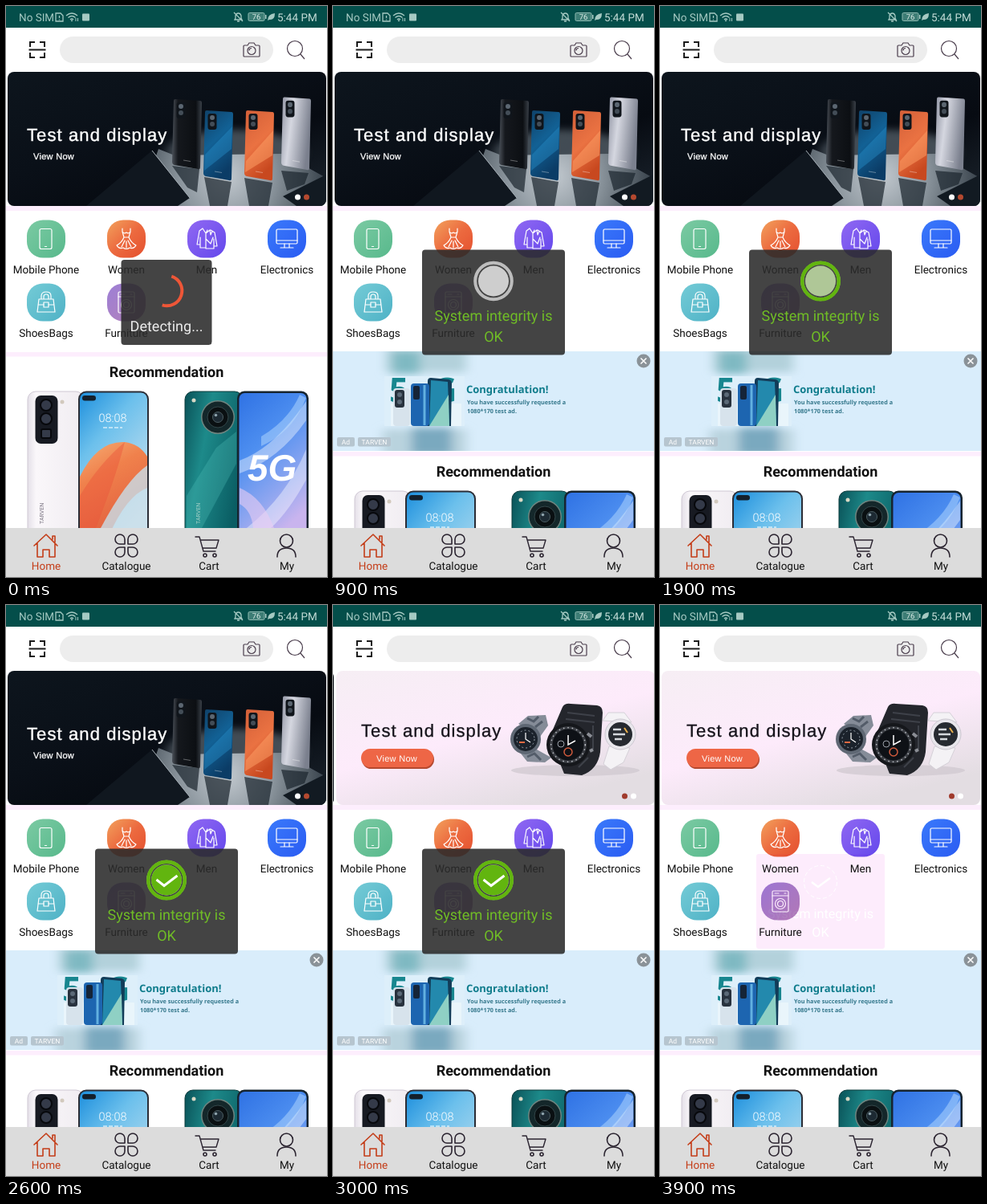
An HTML page for the animation above (4 s loop, 400 by 711 pixels).

```html
<!DOCTYPE html>
<html lang="en">
<head>
<meta charset="utf-8">
<title>Shop home</title>
<style>
  html, body { margin: 0; width: 100%; height: 100%; overflow: hidden; background: #fff; }
  svg { display: block; width: 400px; height: 711px; }
  text { font-family: Roboto, sans-serif; text-rendering: geometricPrecision; }
  .arial { font-family: "Liberation Sans", Arial, sans-serif; }
  .noto { font-family: "Noto Sans", sans-serif; }
  .mid { text-anchor: middle; }
  .label { font-size: 13.5px; text-anchor: middle; }
  .line { fill: none; stroke: #fff; stroke-width: 1.2; stroke-linejoin: round; stroke-linecap: round; }
  .nav { fill: none; stroke: #2b2430; stroke-width: 1.6; stroke-linejoin: round; stroke-linecap: round; }
  #ghost { mix-blend-mode: multiply; }
</style>
</head>
<body>
<svg viewBox="0 0 400 711">
  <defs>
    <linearGradient id="night" x2="1" y2="1">
      <stop offset="0" stop-color="#0d151d"/><stop offset=".4" stop-color="#0a1018"/><stop offset=".65" stop-color="#070b12"/><stop offset="1" stop-color="#1c252e"/>
    </linearGradient>
    <radialGradient id="floor" gradientUnits="userSpaceOnUse" cx="275" cy="212" r="125">
      <stop offset="0" stop-color="#c2c9cf"/><stop offset=".45" stop-color="#8d979f"/><stop offset="1" stop-color="#353f48"/>
    </radialGradient>
    <linearGradient id="day" x2=".6" y2="1">
      <stop offset="0" stop-color="#f6eef4"/><stop offset=".55" stop-color="#fdebfb"/><stop offset="1" stop-color="#e3dde2"/>
    </linearGradient>
    <linearGradient id="black" x2="1"><stop offset="0" stop-color="#4a5058"/><stop offset=".2" stop-color="#15181d"/><stop offset=".8" stop-color="#0c0f13"/><stop offset="1" stop-color="#3a4048"/></linearGradient>
    <linearGradient id="blue" x2=".4" y2="1"><stop offset="0" stop-color="#0f4168"/><stop offset=".5" stop-color="#126195"/><stop offset="1" stop-color="#0b3c66"/></linearGradient>
    <linearGradient id="orange" x2=".4" y2="1"><stop offset="0" stop-color="#d25f38"/><stop offset=".55" stop-color="#ea7242"/><stop offset="1" stop-color="#c8481f"/></linearGradient>
    <linearGradient id="silver" x2="1" y2=".3"><stop offset="0" stop-color="#8d91a0"/><stop offset=".4" stop-color="#d5d7e0"/><stop offset="1" stop-color="#7b808e"/></linearGradient>
    <linearGradient id="pearl" x2="1"><stop offset="0" stop-color="#e4e0e8"/><stop offset=".15" stop-color="#faf7fa"/><stop offset="1" stop-color="#f0ecf1"/></linearGradient>
    <linearGradient id="sky" y2="1" x2=".5"><stop offset="0" stop-color="#1d8fdd"/><stop offset=".35" stop-color="#6cc0ec"/><stop offset="1" stop-color="#d6e6ef"/></linearGradient>
    <linearGradient id="dune" y2="1" x2=".4"><stop offset="0" stop-color="#f5ad74"/><stop offset=".4" stop-color="#f0814c"/><stop offset="1" stop-color="#e2603f"/></linearGradient>
    <linearGradient id="teal" x2="1" y2=".5"><stop offset="0" stop-color="#0a5258"/><stop offset=".4" stop-color="#1d8a8a"/><stop offset="1" stop-color="#0a5d63"/></linearGradient>
    <linearGradient id="dawn" y2="1" x2=".4"><stop offset="0" stop-color="#2f72e4"/><stop offset=".4" stop-color="#4e8ff0"/><stop offset=".75" stop-color="#8fa6f0"/><stop offset="1" stop-color="#c9b4ee"/></linearGradient>
    <linearGradient id="green1" y2="1" x2="1"><stop offset="0" stop-color="#7bcaa3"/><stop offset="1" stop-color="#58b98c"/></linearGradient>
    <linearGradient id="red1" y2="1" x2="1"><stop offset="0" stop-color="#f2a25d"/><stop offset=".5" stop-color="#ec6a3f"/><stop offset="1" stop-color="#e4502f"/></linearGradient>
    <linearGradient id="violet1" y2="1" x2="1"><stop offset="0" stop-color="#9068f2"/><stop offset="1" stop-color="#6448ec"/></linearGradient>
    <linearGradient id="blue1" y2="1" x2="1"><stop offset="0" stop-color="#3a79fb"/><stop offset="1" stop-color="#2a5cf2"/></linearGradient>
    <linearGradient id="cyan1" y2="1" x2="1"><stop offset="0" stop-color="#74cbd6"/><stop offset="1" stop-color="#4fb2c6"/></linearGradient>
    <linearGradient id="plum1" y2="1" x2="1"><stop offset="0" stop-color="#9d7fd6"/><stop offset="1" stop-color="#b482b8"/></linearGradient>
    <filter id="blur" x="-.3" y="-.5" width="1.6" height="2"><feGaussianBlur stdDeviation="7 5"/></filter>
    <clipPath id="bannerBox"><rect y="82" width="400" height="168"/></clipPath>
    <clipPath id="card"><rect x="2" y="82" width="397" height="167" rx="8"/></clipPath>
    <clipPath id="adBox"><rect y="430" width="400" height="124"/></clipPath>
    <g id="phone">
      <path d="M4 2 35 4Q37 4 37 7L35 87Q35 90 32 89L3 84Q0 83 0 80L2 4Q2 2 4 2Z"/>
      <rect x="5.500" y="6" width="11" height="20" rx="3" fill="#10151b"/>
      <circle cx="11" cy="11" r="3" fill="#5b6671"/><circle cx="11" cy="19" r="3" fill="#434d57"/>
      <path d="M14 78l9 1.500" stroke="#fff" opacity=".35"/>
    </g>
    <g id="tile"><rect x="-24" y="-23.500" width="48" height="47" rx="20"/></g>
  </defs>

  <rect width="400" height="711" fill="#fff"/>

  <!-- status bar -->
  <rect width="400" height="27" fill="#044e4a"/>
  <g fill="#a5c9c2" font-size="13.500">
    <text x="16" y="19">No SIM</text>
    <text x="338" y="19" fill="#c4dcd7">5:44 PM</text>
    <rect x="95" y="9.500" width="9" height="9" rx="1"/>
    <path d="M326 18q0-8 9-9q0 9-7 8z"/>
    <rect x="323" y="11" width="1.500" height="5"/>
    <rect x="302" y="8.500" width="20" height="10" rx="1.500" fill="#3d7d75" stroke="#8db8b0"/>
    <text x="312" y="17" font-size="9.500" class="mid" fill="#dcebe7">76</text>
    <g fill="none" stroke="#a5c9c2" stroke-width="1.300">
      <path d="M62 9h6l3 3v7h-9zM66.500 12v3M66.500 16.500v1"/>
      <path d="M75 12q7-6 14 0M77.500 14.500q4.500-4 9 0M80 17q2-2 4 0"/>
      <path d="M285 17h9l-1-2v-3q-1-3-3.500-3t-3.500 3v3zM288 19h3M284 8l11 11"/>
    </g>
    <circle cx="82" cy="18.300" r="1"/><path d="M87 15v4M89.500 15v4" stroke="#a5c9c2"/>
  </g>

  <!-- search row -->
  <rect x="67" y="38" width="266" height="33" rx="16.500" fill="#ededed"/>
  <path d="M30 51v-6h6M42 45h6v6M48 58v6h-6M36 64h-6v-6M28.500 54.500h21" fill="none" stroke="#1b1b1b" stroke-width="2"/>
  <g fill="none" stroke="#4a3d4c" stroke-width="1.200">
    <path d="M297 49h4l2-3h6l2 3h4q1 0 1 1v12q0 1-1 1h-18q-1 0-1-1v-12q0-1 1-1z"/>
    <circle cx="306" cy="55.500" r="5"/><path d="M303 55.500q0-3 3-3"/>
    <circle cx="360" cy="53" r="9.500"/><path d="M367 60l5 6"/>
  </g>

  <!-- carousel -->
  <rect y="249" width="400" height="6" fill="#fdeefd"/>
  <g clip-path="url(#bannerBox)">
    <g id="slides">
      <g clip-path="url(#card)">
        <rect x="2" y="82" width="397" height="167" fill="url(#night)"/>
        <ellipse cx="285" cy="182" rx="85" ry="28" fill="#6b7780" opacity=".6" filter="url(#blur)"/>
        <path d="M165 249 190 178 210 186 345 184 399 214V249Z" fill="url(#floor)"/>
        <path d="M100 249 182 180 229 239 214 249Z" fill="#10171f"/>
        <path d="M182 180 229 239" stroke="#a8b1b8" stroke-width="1"/>
        <path d="M345 237 399 210V249H362Z" fill="#121a22"/>
        <path d="M207 199 241 203 238 232 226 226ZM247 213 281 219 276 249H254ZM297 214 332 220 327 249H303ZM343 205 377 208 372 222 350 230Z" fill="#1b242d" opacity=".7"/>
        <use href="#phone" x="207" y="114" fill="url(#black)"/>
        <use href="#phone" x="343" y="111" transform="translate(0 -4) scale(1 1.040)" fill="url(#silver)"/>
        <use href="#phone" x="246" y="128" fill="url(#blue)"/>
        <path d="M248 185 282 150 281 178 247 205Z" fill="#2a92cc" opacity=".4"/>
        <use href="#phone" x="297" y="128" fill="url(#orange)"/>
        <path d="M299 193 333 155 332 186 298 207Z" fill="#ffa169" opacity=".5"/>
        <text class="arial" x="26" y="168" font-size="22" letter-spacing="1.100" fill="#fff" stroke="#fff" stroke-width=".4">Test and display</text>
        <text class="arial" x="34" y="191" font-size="11" letter-spacing=".3" fill="#fff" stroke="#fff" stroke-width=".3">View Now</text>
      </g>
      <g transform="translate(400)"><g clip-path="url(#card)">
        <rect x="2" y="82" width="397" height="167" fill="url(#day)"/>
        <ellipse cx="300" cy="206" rx="80" ry="7" fill="#cfc8cf" opacity=".7"/>
        <text class="arial" x="33" y="164" font-size="22" letter-spacing="1.100" fill="#15121a" stroke="#15121a" stroke-width=".3">Test and display</text>
        <rect x="34" y="181" width="90" height="23" rx="11.500" fill="#b5492f"/>
        <rect x="33" y="179" width="90" height="23" rx="11.500" fill="#ee6646"/>
        <text class="arial" x="52" y="195" font-size="11" letter-spacing=".3" fill="#fff">View Now</text>
        <!-- camouflage watch -->
        <path d="M229 148 241 138 263 137 266 150 256 164ZM228 180 252 180 270 190 262 196 240 195Z" fill="#858c98"/>
        <path d="M240 141l8 4 6-6M250 152l9-7M240 189l9-4 8 8" stroke="#535c69" stroke-width="3" fill="none"/>
        <circle cx="238" cy="167" r="19" fill="#5f6874"/><circle cx="238" cy="167" r="15" fill="#1b222b"/>
        <circle cx="238" cy="167" r="11" fill="none" stroke="#9aa4ae" stroke-dasharray="2 3"/>
        <path d="M238 159v8l6 4" stroke="#fff" stroke-width="1.200" fill="none"/>
        <path d="M230 171h7" stroke="#e06a42" stroke-width="2"/>
        <!-- white watch -->
        <path d="M334 144 341 134 361 134 370 146ZM342 176 368 178 360 196 344 205 335 198Z" fill="#f4f2f5" stroke="#d5d1d8"/>
        <circle cx="356" cy="161" r="19" fill="#e9e7ec" stroke="#cac6cf"/><circle cx="356" cy="161" r="15" fill="#262a30"/>
        <path d="M347 155h10M347 161h15M349 167h9" stroke="#d4d8dc" stroke-width="2.500"/><path d="M361 153l4 6" stroke="#e9b04b" stroke-width="2"/>
        <!-- black watch -->
        <path d="M272 155 284 127Q287 122 294 123L327 125Q334 126 334 134L331 183Q328 205 308 212L286 210 282 200Z" fill="#24262c"/>
        <path d="M290 134l34 4M288 142l36 4M322 150v30M316 190l-12 12" stroke="#3e4149" stroke-width="2"/>
        <circle cx="291" cy="174" r="27" fill="#15171b"/><circle cx="291" cy="174" r="23" fill="#3a3d43"/><circle cx="291" cy="174" r="19.500" fill="#0e1116"/>
        <circle cx="291" cy="174" r="21.300" fill="none" stroke="#b9bcc2" stroke-width="1.500" stroke-dasharray="1.500 4"/>
        <circle cx="291" cy="183" r="5" fill="none" stroke="#cf5a3c" stroke-width="1.500"/><circle cx="282" cy="173" r="4" fill="none" stroke="#9aa0a8"/>
        <path d="M291 162v12l9-5" stroke="#fff" stroke-width="1.500" fill="none"/>
        <path d="M315 160l5 4M318 182l4-2" stroke="#8b8e95" stroke-width="4"/>
      </g></g>
    </g>
  </g>
  <circle id="dotA" cx="363.500" cy="238" r="3.500"/><circle id="dotB" cx="374.500" cy="238" r="3.500"/>

  <!-- categories -->
  <g transform="translate(50 290)"><use href="#tile" fill="url(#green1)"/>
    <g class="line"><rect x="-8" y="-12.500" width="15" height="25" rx="2"/><path d="M-1.500 9.500h2"/></g></g>
  <g transform="translate(150 290)"><use href="#tile" fill="url(#red1)"/>
    <path class="line" d="M-5-13v4q2 3 5 1q3 2 5-1v-4M-5-9l2 7h6l2-7M-3-2Q-6 5-12 8Q-9 13-4 11Q0 14 4 11Q9 13 12 8Q6 5 3-2M-2 2l-4 8M2 2l4 8M0 3v8"/></g>
  <g transform="translate(250 290)"><use href="#tile" fill="url(#violet1)"/>
    <path class="line" d="M-5-13l-4 3-3 17h4v4h7V0M-5-13l4 6 2-4M-1-7v7M5-11l5 3 3 17h-4v3H-1V0l6 6 3-8M-1-7l5-4 1 6 2-5M-8-2v9M9 0v9"/></g>
  <g transform="translate(350 290)"><use href="#tile" fill="url(#blue1)"/>
    <g class="line"><rect x="-13" y="-12" width="26" height="18" rx="1.500"/><path d="M-13 2h26M-3 6v5M3 6v5M-8 11H8"/></g></g>
  <g transform="translate(50 369)"><use href="#tile" fill="url(#cyan1)"/>
    <g class="line"><path d="M-9-4H9L11 12H-11ZM-6-4v-4q0-5 6-5t6 5v4M-3-4v-3q0-3 3-3t3 3v3M-10 3h7M3 3h7"/><rect x="-3" y="0" width="6" height="6"/></g></g>
  <g transform="translate(150 369)"><use href="#tile" fill="url(#plum1)"/>
    <g class="line"><rect x="-10" y="-13" width="20" height="26" rx="1.500"/><path d="M-10-7h20M-7-10h5M5-10h2"/><circle cy="3" r="6.500"/><circle cy="3" r="3.500"/></g></g>
  <g class="label" fill="#111">
    <text x="50" y="333">Mobile Phone</text><text x="150" y="333">Women</text><text x="250" y="333">Men</text><text x="350" y="333">Electronics</text>
    <text x="50" y="412">ShoesBags</text><text x="150" y="412">Furniture</text>
  </g>

  <!-- advert -->
  <g id="ad" clip-path="url(#adBox)">
    <rect y="430" width="400" height="124" fill="#d9edfb"/>
    <g filter="url(#blur)">
      <rect x="66" y="426" width="100" height="30" fill="#b3d1db"/><rect x="74" y="430" width="34" height="28" fill="#7fb9c2"/>
      <rect x="62" y="527" width="104" height="34" fill="#b9d3de"/><rect x="98" y="525" width="50" height="34" fill="#7aa9bf"/>
    </g>
    <rect x="64" y="461" width="100" height="62" fill="#ddeffa"/>
    <g font-size="42" font-weight="800" fill="#17868f"><text class="noto" x="70" y="493">5</text><text class="noto" x="124" y="493">G</text></g>
    <path d="M72 495H160V523H72Z" fill="#e9f5fb"/>
    <path d="M122 463 144 465Q148 466 148 470L147 523H117L118 467Q118 463 122 463Z" fill="#123c58"/><path d="M122 466 143 468 145 523H120Z" fill="#2389ad"/><path d="M120 523 144 484 145 523Z" fill="#8fd0c4"/>
    <rect x="97" y="470" width="23" height="53" rx="4" fill="#1d65b0"/><rect x="100" y="473" width="8" height="17" rx="2" fill="#152438"/><path d="M114 472v50" stroke="#62b0e0" stroke-width="3"/>
    <rect x="75" y="476" width="21" height="47" rx="4" fill="#d7e3ec"/><rect x="77" y="478" width="12" height="22" rx="3" fill="#28323e"/><circle cx="83" cy="484" r="3" fill="#5b6977"/><circle cx="83" cy="493" r="3" fill="#5b6977"/>
    <text class="noto" x="166" y="482" font-size="13" font-weight="700" fill="#0f7c8c">Congratulation!</text>
    <g font-size="7.250" font-weight="600" fill="#35788c"><text class="noto" x="167" y="495.500">You have successfully requested a</text><text class="noto" x="167" y="506.500">1080*170 test ad.</text></g>
    <g fill="#b6c5cf"><rect x="5" y="537" width="22" height="11.500" rx="2"/><rect x="31" y="537" width="41" height="11.500" rx="2"/></g>
    <g fill="#fff" font-size="8.500" class="mid"><text x="16" y="546">Ad</text><text x="51.500" y="546">TARVEN</text></g>
    <circle cx="387" cy="442" r="8.500" fill="#8a9298"/><path d="M383.500 438.500l7 7M390.500 438.500l-7 7" stroke="#fff" stroke-width="1.500"/>
  </g>

  <!-- recommendation -->
  <g id="shelf">
    <rect y="431" width="400" height="5.500" fill="#fdeefd"/>
    <text x="200" y="462" class="mid" font-size="18" font-weight="700" fill="#111">Recommendation</text>
    <rect x="27" y="480" width="70" height="190" rx="10" fill="url(#pearl)" stroke="#cfc8d4"/>
    <rect x="36.500" y="485" width="28" height="60" rx="7" fill="#171a22"/>
    <g fill="#343a49" stroke="#07080c" stroke-width="2"><circle cx="50" cy="497" r="7"/><circle cx="50" cy="514" r="7"/><rect x="44" y="527" width="12" height="11" rx="2"/></g>
    <circle cx="70" cy="493" r="2.500" fill="#d2c9bd"/>
    <text transform="translate(47 645) rotate(-90)" font-size="7" fill="#77717f">TARVEN</text>
    <rect x="90" y="479.500" width="88" height="190" rx="10" fill="#2b2d36"/>
    <rect x="92" y="481.500" width="84" height="190" rx="8" fill="url(#sky)"/>
    <path d="M92 586Q114 541 148 543Q166 545 176 561V600Q150 610 128 660H92Z" fill="url(#dune)"/>
    <path d="M176 572Q150 590 118 650H176Z" fill="#c9dfea" opacity=".8"/>
    <path d="M92 610Q116 570 148 543Q136 590 108 660H92Z" fill="#e9553a" opacity=".45"/>
    <rect x="95" y="485" width="17" height="6.500" rx="3.250" fill="#14202c"/>
    <text x="133" y="518" class="mid" font-size="14.500" font-weight="300" fill="#fff">08:08</text><path d="M121 525h24" stroke="#fff" stroke-width="1.500" stroke-dasharray="5 2" opacity=".7"/>
    <rect x="223" y="480" width="72" height="190" rx="10" fill="url(#teal)" stroke="#0b3a3b"/>
    <path d="M225 610 262 550 287 530V570L244 650H225Z" fill="#4fc0b8" opacity=".3"/>
    <circle cx="264" cy="512" r="21" fill="#6f8580"/><circle cx="264" cy="512" r="19.500" fill="#14272a"/><circle cx="264" cy="512" r="13" fill="#0a1012" stroke="#33474a"/>
    <circle cx="264" cy="512" r="6.500" fill="#1d2a33" stroke="#4b5c61"/><circle cx="261.500" cy="509.500" r="1.800" fill="#8ea3ac"/>
    <circle cx="234" cy="491" r="2.500" fill="#d9d9c5"/>
    <text transform="translate(242 645) rotate(-90)" font-size="7" fill="#a9d3c9">TARVEN</text>
    <rect x="288" y="479.500" width="89" height="190" rx="9" fill="#16242f"/>
    <rect x="290.500" y="482" width="84" height="190" rx="7" fill="url(#dawn)"/>
    <path d="M291 566Q335 550 374 492V516Q340 565 291 582ZM300 650Q350 610 374 552V590Q352 630 330 650Z" fill="#fff" opacity=".4"/>
    <path d="M291 600Q320 612 334 650H308Q306 628 291 620Z" fill="#e9cdf4" opacity=".6"/>
    <path d="M318 536Q352 516 366 484L374 488Q358 530 318 548Z" fill="#bfe0ff" opacity=".45"/>
    <text class="arial" x="301" y="591" font-size="46" font-weight="700" font-style="italic" fill="#fff">5G</text>
  </g>

  <!-- bottom navigation -->
  <rect y="650" width="400" height="61" fill="#dcdcdc"/>
  <g class="nav">
    <path d="M35 672 50 658 64 672M39 669V686H46V677H54V686H61V669M58 664V660H61V668" stroke="#c43d18"/>
    <path d="M148 670h-6a6 6 0 1 1 6-6zM152 670v-6a6 6 0 1 1 6 6zM148 674v6a6 6 0 1 1-6-6zM152 674h6a6 6 0 1 1-6 6z"/>
    <path d="M236 661h5l5 18h15M242 665h23l-3 10h-17" stroke-width="1.400"/><circle cx="248" cy="684" r="2"/><circle cx="260" cy="684" r="2"/>
    <circle cx="349.500" cy="666" r="8"/><path d="M338 686q0-11 11.500-11t11.500 11"/>
  </g>
  <g class="label" fill="#111">
    <text x="50" y="702" fill="#c43d18">Home</text><text x="150" y="702">Catalogue</text><text x="253" y="702">Cart</text><text x="350" y="702">My</text>
  </g>

  <!-- dialogs -->
  <g id="busy">
    <rect x="143.500" y="316" width="113" height="106" rx="4" fill="#2b2b2b" fill-opacity=".88"/>
    <circle id="arc" cx="200.500" cy="354.500" r="18.800" pathLength="360" fill="none" stroke="#ee5637" stroke-width="4"/>
    <text x="200" y="405" class="mid" font-size="18" fill="#ececec">Detecting...</text>
  </g>
  <g id="done">
    <rect x="111" y="303.500" width="178" height="131" rx="4" fill="#2b2b2b" fill-opacity=".88"/>
    <circle cx="200" cy="342.500" r="22.800" fill="none" stroke="#bdbdbd" stroke-width="4"/>
    <circle cx="200" cy="342.500" r="19" fill="#cecece"/>
    <circle id="fill" cx="200" cy="342.500" r="19" fill="#62b50f"/>
    <circle id="ring" cx="200" cy="342.500" r="22.800" pathLength="360" fill="none" stroke="#62b50f" stroke-width="4.500" transform="rotate(-90 200 342.500)"/>
    <path id="tick" d="M187.500 342 197 349.500 213.500 337" pathLength="100" fill="none" stroke="#fff" stroke-width="3"/>
    <g class="mid" font-size="18" fill="#70bd26"><text x="200" y="392">System integrity is</text><text x="200" y="418">OK</text></g>
  </g>
  <g id="ghost">
    <rect x="120" y="310" width="160" height="118" rx="3" fill="#fdecfc"/>
    <g fill="none" stroke="#fff"><circle cx="200" cy="345" r="20.500" stroke-dasharray="5 3"/><path d="M189 345 197 351 212 340" stroke-width="2.500"/></g>
    <g class="mid" font-size="16.200" fill="#fff"><text x="200" y="390">System integrity is</text><text x="200" y="413">OK</text></g>
  </g>
</svg>
<script>
  const LOOP = 4000, STEP = 100;
  const $ = id => document.getElementById(id);
  const set = (id, attrs) => { for (const k in attrs) $(id).setAttribute(k, attrs[k]); };
  const show = (id, on) => set(id, { visibility: on ? "visible" : "hidden" });
  const ramp = (t, from, to) => Math.min(1, Math.max(0, (t - from) / (to - from)));

  function draw(t) {
    const adOn = t >= 200;
    show("ad", adOn);
    set("shelf", { transform: `translate(0 ${adOn ? 124 : 0})` });

    // carousel settles with a quintic ease-out
    const slide = 1 - (1 - ramp(t, 2650, 3186)) ** 5;
    set("slides", { transform: `translate(${-400 * slide})` });
    const second = slide > 0.5;
    set("dotA", { fill: second ? "#a03a2c" : "#fff" });
    set("dotB", { fill: second ? "#fff" : "#b5492f" });

    show("busy", t < 700);
    const start = -72 + t * 0.04, sweep = 180 + t * 0.2;
    set("arc", { "stroke-dasharray": `${sweep} ${360 - sweep}`, transform: `rotate(${start} 200.5 354.5)` });

    show("done", t >= 700 && t < 3900);
    set("ring", { "stroke-dasharray": `${360 * ramp(t, 1000, 1700)} 400`, opacity: t > 1000 ? 1 : 0 });
    set("fill", { opacity: ramp(t, 1700, 2400) });
    set("tick", { "stroke-dasharray": `${100 * ramp(t, 2200, 2500)} 200`, opacity: t > 2200 ? 1 : 0 });

    const out = ramp(t, 3700, 3900), s = 1 - 0.1 * out;
    set("done", { opacity: 1 - out, transform: `translate(200 369) scale(${s}) translate(-200 -369)` });
    show("ghost", t >= 3900);
  }

  const t0 = performance.now();
  function tick() {
    const t = (performance.now() - t0) % LOOP;
    draw(Math.floor(t / STEP) * STEP);
    requestAnimationFrame(tick);
  }
  draw(0);
  requestAnimationFrame(tick);
</script>
</body>
</html>
```
